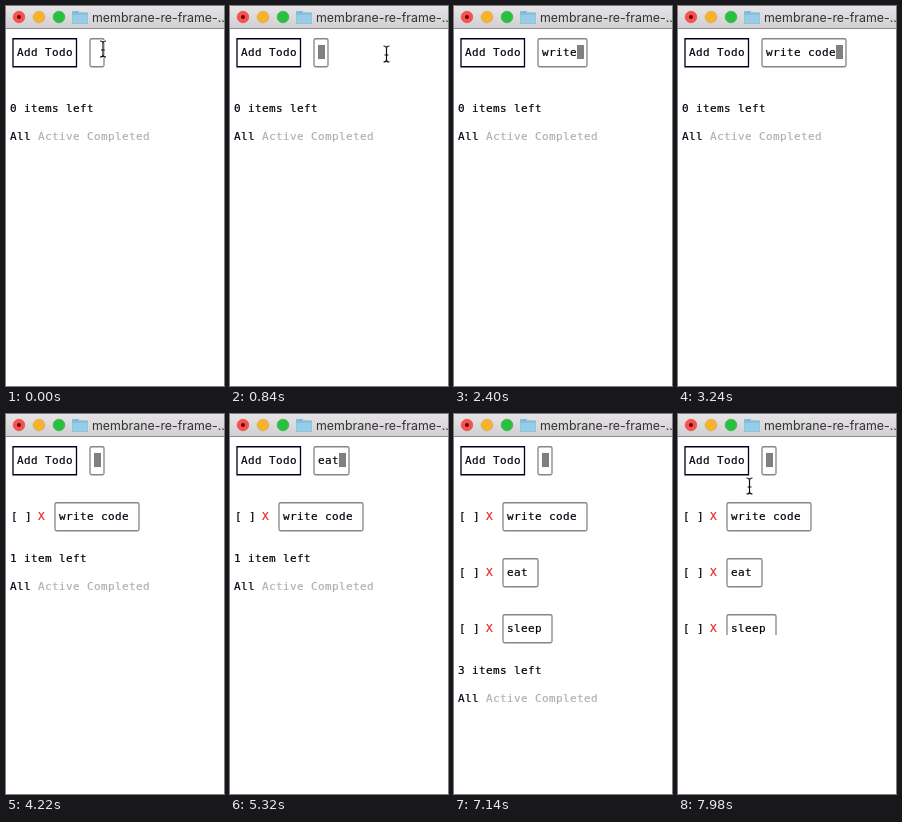
An HTML page with a canvas that plays this animation: 218x380 px, repeating every 8000 ms.

```html
<!DOCTYPE html>
<html lang="en">
<head>
<meta charset="utf-8">
<title>Todo list</title>
<style>
  html, body { margin: 0; height: 100%; overflow: hidden; background: #fff; }
  canvas { display: block; }
</style>
</head>
<body>
<canvas id="stage" width="218" height="380"></canvas>
<script>
const ctx = document.getElementById('stage').getContext('2d');
const LOOP = 8000, CHAR = 7, ROW = 56;
const MONO = '11px "DejaVu Sans Mono", monospace';
const INK = '#00000c', MUTED = '#b0b0b0';

// Each todo: its text, the time of every key press, and when it is added.
const todos = [
  { text: 'write code', keys: [1840, 2080, 2240, 2320, 2400, 2540, 2800, 2940, 3100, 3240], added: 4200 },
  { text: 'eat', keys: [5060, 5160, 5320], added: 5600 },
  { text: 'sleep', keys: [6020, 6160, 6320, 6580, 6740], added: 7140 },
];

// Pointer path: time, x, y
const pointerPath = [[0, 97, 43], [20, 97, 43], [160, 95, 43], [420, 95, 43], [840, 156, 48]];

function label(text, x, y, color = INK) {
  ctx.font = MONO;
  ctx.letterSpacing = '0.38px';
  ctx.fillStyle = ctx.strokeStyle = color;
  ctx.lineWidth = 0.2;
  ctx.fillText(text, x, y);
  ctx.strokeText(text, x, y);
}

function disc(x, y, r, color, edge) {
  ctx.beginPath();
  ctx.arc(x, y, r, 0, 7);
  ctx.fillStyle = color;
  ctx.fill();
  if (edge) {
    ctx.lineWidth = 0.6;
    ctx.strokeStyle = edge;
    ctx.stroke();
  }
}

function box(x, y, w, color, radius) {
  ctx.beginPath();
  ctx.roundRect(x, y - 0.25, w, 28, radius);
  ctx.lineWidth = 1.3;
  ctx.strokeStyle = color;
  ctx.stroke();
}

function field(text, x, y) {
  box(x, y, 14 + CHAR * text.length, '#868686', 1.5);
  label(text, x + 4, y + 17);
}

function titleBar() {
  const shade = ctx.createLinearGradient(0, 0, 0, 22);
  shade.addColorStop(0, '#e6e4e6');
  shade.addColorStop(1, '#d1cfd1');
  ctx.fillStyle = shade;
  ctx.fillRect(0, 0, 218, 22);
  ctx.fillStyle = '#8c8a8c';
  ctx.fillRect(0, 22, 218, 1);

  disc(13, 11, 5.8, '#fc504c', '#df4744');
  disc(13, 11, 2, '#5a0806');
  disc(33, 11, 5.8, '#f8b32d', '#de9f34');
  disc(53, 11, 5.8, '#29c140', '#27aa35');

  ctx.fillStyle = '#7dbddb';
  ctx.beginPath();
  ctx.roundRect(66, 5, 7, 5, 1);
  ctx.roundRect(66, 6.5, 16, 11.5, 1);
  ctx.fill();
  ctx.fillStyle = '#97cde6';
  ctx.fillRect(66.5, 8.5, 15, 9);

  ctx.font = '12.4px Inter, sans-serif';
  ctx.letterSpacing = '0px';
  ctx.fillStyle = '#333';
  ctx.fillText('membrane-re-frame-...', 86, 15.5);
}

function pointer(x, y) {
  ctx.beginPath();
  for (const s of [-1, 1]) {
    ctx.moveTo(x - 3, y + 8 * s);
    ctx.quadraticCurveTo(x, y + 8 * s, x, y + 6 * s);
    ctx.quadraticCurveTo(x, y + 8 * s, x + 3, y + 8 * s);
  }
  ctx.moveTo(x, y - 6);
  ctx.lineTo(x, y + 6);
  ctx.moveTo(x - 2, y + 1);
  ctx.lineTo(x + 2, y + 1);
  for (const [width, color] of [[2.6, '#fff'], [1.2, '#111']]) {
    ctx.lineWidth = width;
    ctx.strokeStyle = color;
    ctx.stroke();
  }
}

function pointerAt(t) {
  if (t >= 7980) return [71.5, 72];
  if (t >= 7960) return [76, 64];
  if (t >= 1840) return null;
  const i = pointerPath.findIndex(p => p[0] > t);
  if (i < 0) return [156.5, 48];
  const [t0, x0, y0] = pointerPath[i - 1], [t1, x1, y1] = pointerPath[i];
  const k = (t - t0) / (t1 - t0);
  return [x0 + (x1 - x0) * k, y0 + (y1 - y0) * k];
}

function draw(t) {
  ctx.fillStyle = '#fff';
  ctx.fillRect(0, 0, 218, 380);
  titleBar();

  box(7, 33, 63.5, '#000018', 0);
  label('Add Todo', 11, 50);

  const items = todos.filter(todo => t >= todo.added);
  const next = todos[items.length];
  const typed = next ? next.text.slice(0, next.keys.filter(k => t >= k).length) : '';
  if (t >= 420) {
    ctx.fillStyle = '#808080';
    ctx.fillRect(88 + CHAR * typed.length, 39, 7, 14);
  }
  field(typed, 84, 33);

  items.forEach((item, i) => {
    const y = 89 + ROW * i;
    label('[ ]', 5, y + 17);
    label('X', 32, y + 17, '#e8201c');
    field(item.text, 49, y);
  });

  const n = items.length;
  const y = n ? 92 + ROW * n : 106;
  label(`${n} item${n === 1 ? '' : 's'} left`, 4, y);
  label('All', 4, y + 28);
  label('Active Completed', 32, y + 28, MUTED);

  // The lower part of the list blanks just before the loop restarts.
  if (t >= 7980) {
    ctx.fillStyle = '#fff';
    ctx.fillRect(0, 221, 218, 159);
  }

  const at = pointerAt(t);
  if (at) pointer(...at);
}

const start = performance.now();
function tick() {
  draw((performance.now() - start) % LOOP);
  requestAnimationFrame(tick);
}
tick();
</script>
</body>
</html>
```
